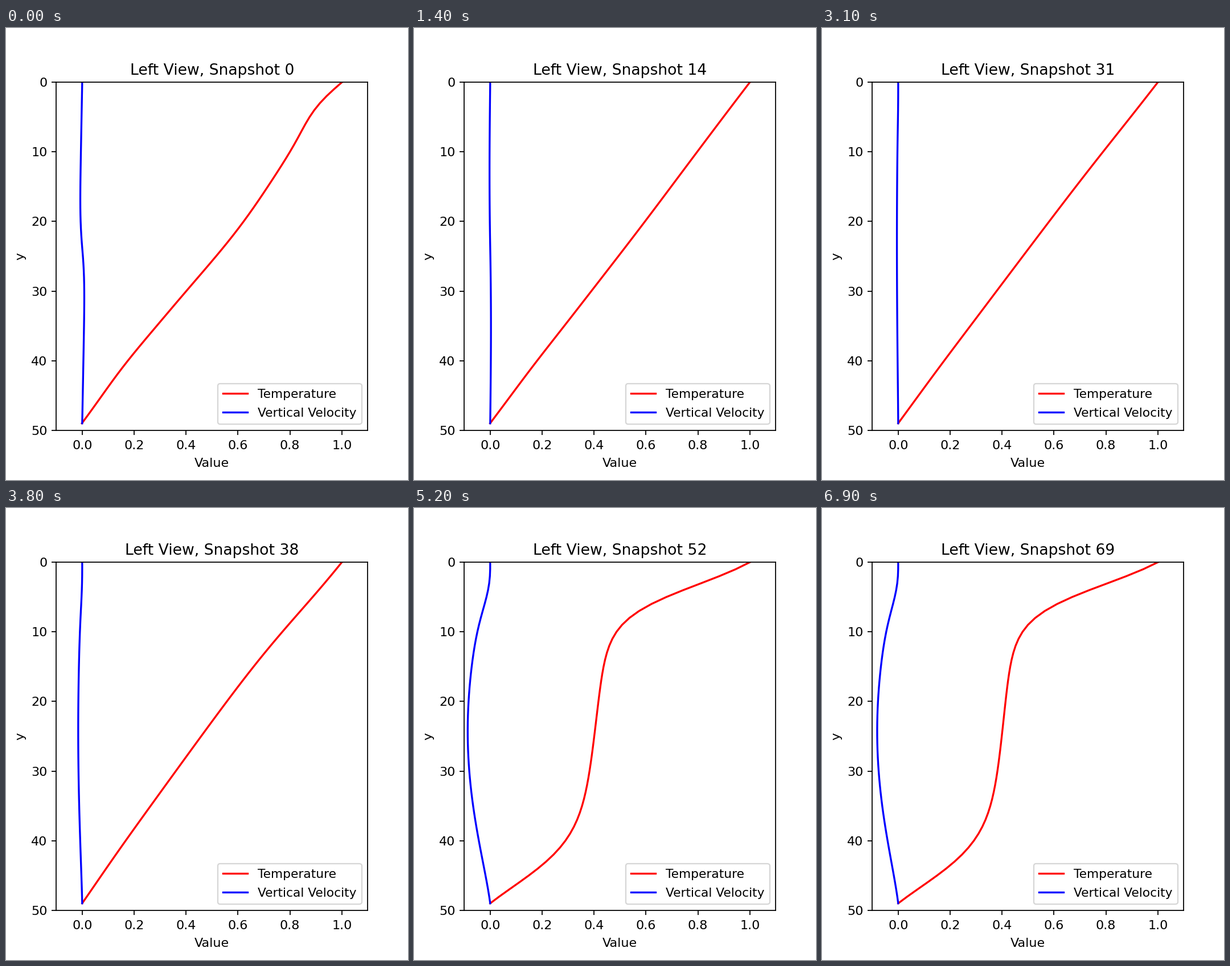
Write a matplotlib script that moves like this. It is 706x793 px and loops after 7 s.

```python
import numpy as np
import matplotlib.pyplot as plt
from matplotlib.animation import FuncAnimation

DPI = 160
FRAMES = 70
BASE = 49
y = np.arange(BASE + 1.0)
z = BASE - y

# Key points of the overturning: time, flow speed, mixing, core temperature
TIMES = [14, 23, 32, 38, 42, 46, 50, 55, 59, 64, 69]
FLOW = [0, 0.001, 0.0055, 0.0155, 0.032, 0.0577, 0.083, 0.0935, 0.0912, 0.083, 0.0815]
MIXING = [0, 0, 0.015, 0.05, 0.17, 0.4, 0.75, 1.02, 1, 0.92, 0.873]
CORE = [0.49, 0.49, 0.478, 0.457, 0.425, 0.383, 0.393, 0.415, 0.42, 0.408, 0.4]

# Shape of the downward flow, flatter at the top than at the bottom
FLOW_SHAPE = (np.sin(np.pi * y / BASE) * (1 - np.exp(-(y / 5.8)**2))
              * (1 - 0.35 * np.exp(-z / 6)))


def bump(centre, width):
    return np.exp(-((y - centre) / width)**2 / 2)


def layer(distance, thickness, shoulder):
    """Boundary layer falling from 1 at the wall to 0 in the core."""
    return (shoulder + 1) / (shoulder + np.exp(distance / thickness))


def temperature(n):
    mix = np.interp(n, TIMES, MIXING)
    core = np.interp(n, TIMES, CORE) - (1 - mix) / BASE * (y - 25)
    top = layer(y, 4.6 - 2.3 * mix**0.6, 5.3 - 2.4 * mix**2)
    bottom = layer(z, 3.6, 1.9)
    profile = core + (1 - core[0]) * top - core[-1] * bottom

    # Initial disturbances that diffuse away
    cold_top = y / 4 * np.exp(0.5 - (y / 4)**2 / 2)
    profile += 0.03 * bump(21, 7) * np.exp(-n / 7)
    profile -= 0.026 * cold_top * np.exp(-n / 3)
    profile -= 0.009 * bump(41, 4) * np.exp(-n / 14)
    return profile


def velocity(n):
    # An antisymmetric swirl that swells, widens and fades
    swirl = 0.0125 * (1 + n / 2) * np.exp(-n / 6)
    tent = np.minimum(y, z) / (BASE / 2)
    early = swirl * tent * np.tanh((y - 23.8) / (5.5 + n))
    return early - np.interp(n, TIMES, FLOW) * FLOW_SHAPE


fig, ax = plt.subplots(figsize=(706 / DPI, 793 / DPI), dpi=DPI)
temp_line, = ax.plot([], [], color="red", label="Temperature")
speed_line, = ax.plot([], [], color="blue", label="Vertical Velocity")
ax.set_xlim(-0.1, 1.1)
ax.set_ylim(50, 0)
ax.tick_params(axis="x", pad=4.2)
ax.set_xlabel("Value", labelpad=4.8)
ax.set_ylabel("y")
ax.legend(loc="lower right", fontsize=9.8, labelspacing=0.6, borderpad=0.42)
title = ax.set_title("")


def draw(n):
    temp_line.set_data(temperature(n), y)
    speed_line.set_data(velocity(n), y)
    title.set_text(f"Left View, Snapshot {n}")
    return temp_line, speed_line, title


anim = FuncAnimation(fig, draw, frames=FRAMES, interval=100, repeat=True, repeat_delay=0)
plt.show()
```
